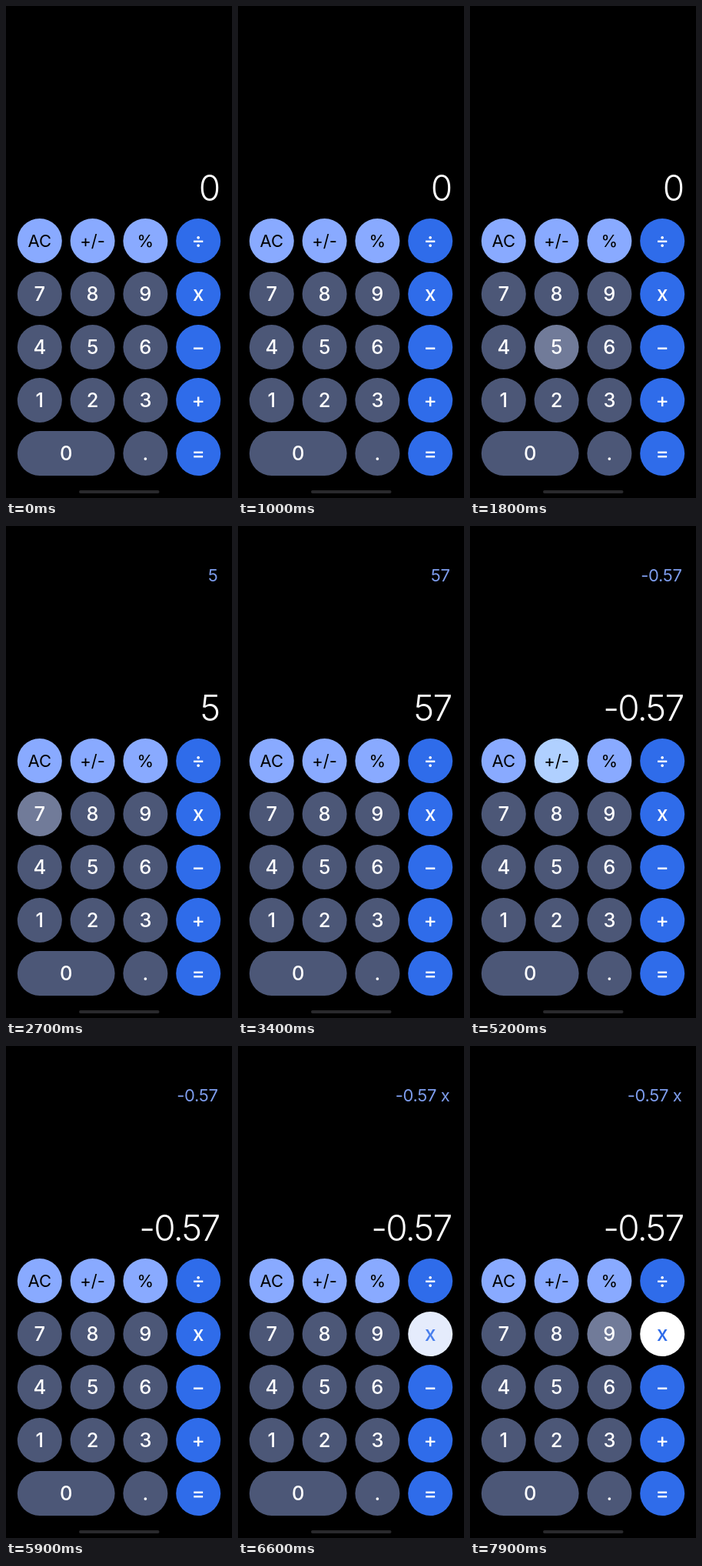
These frames come from a looping animation (294x639 px, 8 s). An HTML page:

```html
<!DOCTYPE html>
<html lang="en">
<head>
<meta charset="utf-8">
<title>Calculator</title>
<style>
  html, body { margin: 0; width: 100%; height: 100%; overflow: hidden; background: #000; }
  svg { display: block; width: 100vw; height: 100vh; }
  text { font-family: Inter, sans-serif; fill: #fff; }
  .key { text-anchor: middle; font-size: 25.5px; font-weight: 500; }
  .light { font-size: 22px; font-weight: 400; fill: #000; }
  .operator { font-size: 26px; }
  .readout { text-anchor: end; }
  #value { font-size: 46px; font-weight: 300; letter-spacing: -1.7px; }
  #history { font-size: 22px; letter-spacing: -.35px; fill: #7d9cec; }
</style>
</head>
<body>
<svg id="stage" viewBox="0 0 294 639">
  <rect width="294" height="639"/>
  <text id="history" class="readout" x="275.5" y="72"/>
  <text id="value" class="readout" x="277.5" y="252.5"/>
  <rect x="95" y="629" width="104.5" height="4" rx="2" fill="#29292c"/>
</svg>
<script>
const LOOP = 8000;
const PITCH = 68.8;
const DIAMETER = 58;
const BLUE = [47, 108, 234];
const WHITE = [255, 255, 255];
const THEMES = {
  digit: { base: [76, 87, 119], lit: [113, 123, 153] },
  light: { base: [137, 170, 255], lit: [176, 208, 255] },
  operator: { base: BLUE, lit: WHITE }
};
const ROWS = [
  ['AC', '+/-', '%', '÷'],
  ['7', '8', '9', 'x'],
  ['4', '5', '6', '−'],
  ['1', '2', '3', '+'],
  ['0', null, '.', '=']
];

// Each press lights a key; the readouts change when it is released.
const PRESSES = [
  { key: '5', down: 1700, up: 1900, value: '5', history: '5' },
  { key: '7', down: 2600, up: 2800, value: '57', history: '57' },
  { key: '%', down: 3850, up: 4000, value: '0.57', history: '0.57' },
  { key: '+/-', down: 5000, up: 5200, value: '-0.57', history: '-0.57' },
  { key: 'x', down: 6400, up: 6500, value: '-0.57', history: '-0.57 x', stays: true },
  { key: '9', down: 7800, up: 8000 }
];

const stage = document.getElementById('stage');
const valueText = document.getElementById('value');
const historyText = document.getElementById('history');
const keys = {};

function add(tag, attributes, content = '') {
  const node = document.createElementNS('http://www.w3.org/2000/svg', tag);
  for (const name in attributes) node.setAttribute(name, attributes[name]);
  node.textContent = content;
  return stage.appendChild(node);
}

ROWS.forEach((row, r) => row.forEach((label, c) => {
  if (!label) return;
  const kind = c === 3 ? 'operator' : r === 0 ? 'light' : 'digit';
  const x = 14.8 + c * PITCH;
  const y = 276 + r * 69;
  const width = label === '0' ? DIAMETER + PITCH : DIAMETER;
  const face = add('rect', { x, y, width, height: DIAMETER, rx: DIAMETER / 2 });
  const text = add('text', {
    class: `key ${kind}`, x: x + width / 2, y: y + (kind === 'light' ? 37 : 38.3)
  }, label);
  keys[label] = { face, text, kind };
}));

const clamp = v => Math.max(0, Math.min(1, v));
const mix = (a, b, p) => `rgb(${a.map((v, i) => Math.round(v + (b[i] - v) * p))})`;

function glow(press, t) {
  const rise = clamp((t - press.down) / (press.stays ? 230 : 80));
  const fall = press.stays ? 0 : clamp((t - press.up) / 300);
  return rise * (1 - fall);
}

function draw(t) {
  let value = '0', history = '';
  const glows = {};
  for (const press of PRESSES) {
    glows[press.key] = glow(press, t);
    if (t >= press.up) ({ value, history } = press);
  }
  valueText.textContent = value;
  historyText.textContent = history;
  for (const label in keys) {
    const { face, text, kind } = keys[label];
    const level = glows[label] || 0;
    const { base, lit } = THEMES[kind];
    face.style.fill = mix(base, lit, level);
    if (kind === 'operator') text.style.fill = mix(WHITE, BLUE, level);
  }
}

const start = performance.now();
function frame() {
  draw((performance.now() - start) % LOOP);
  requestAnimationFrame(frame);
}
draw(0);
requestAnimationFrame(frame);
</script>
</body>
</html>
```
